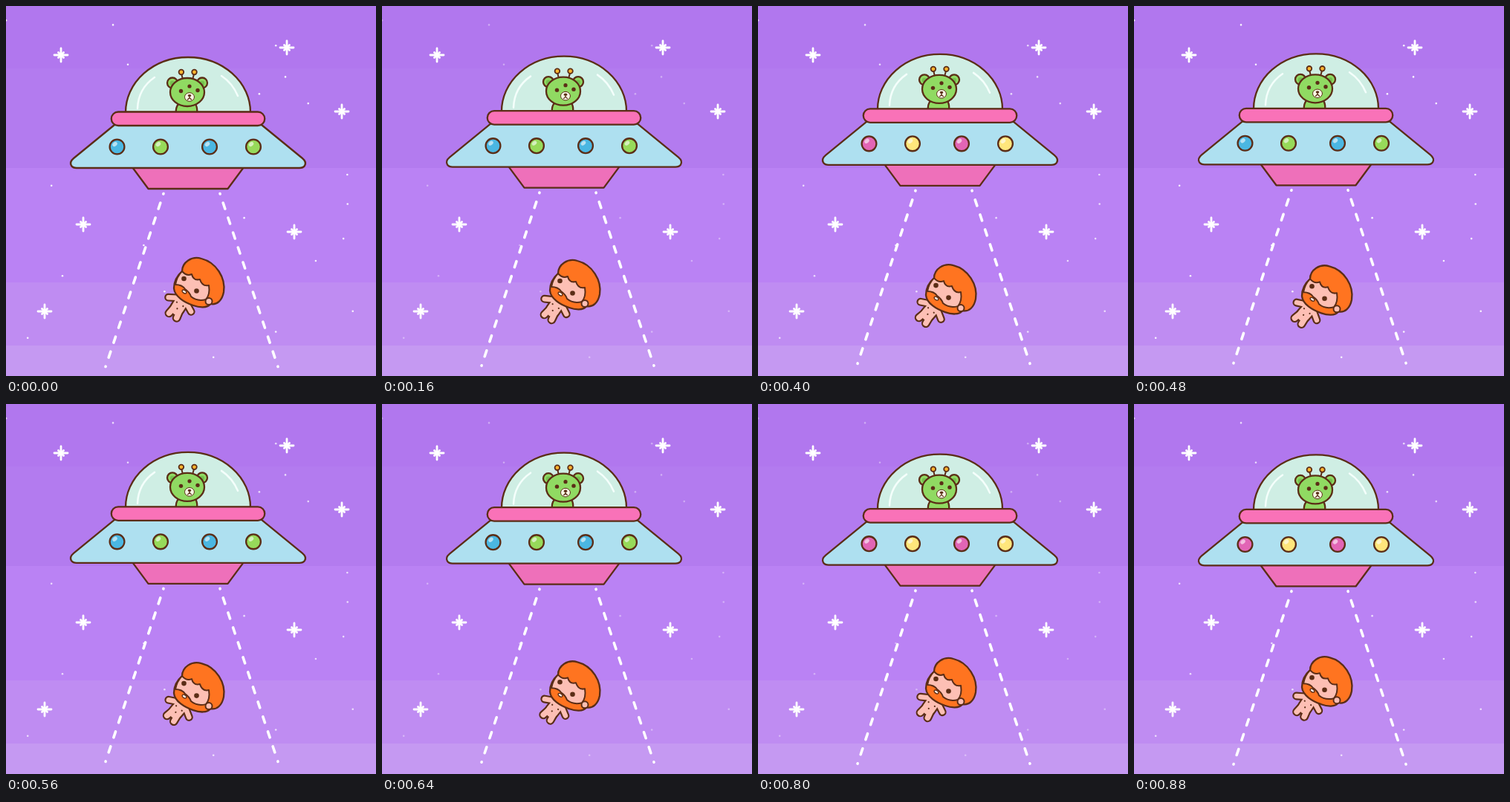
An HTML page with a canvas for the animation above (0.96 s loop, 498x498 px).

```html
<!DOCTYPE html>
<html lang="en">
<head>
<meta charset="utf-8">
<title>Abduction</title>
<style>
html, body { margin: 0; width: 100%; height: 100%; overflow: hidden; background: #b982f4; }
canvas { display: block; }
</style>
</head>
<body>
<canvas id="stage" width="498" height="498"></canvas>
<script>
const ctx = document.getElementById('stage').getContext('2d');
const STEP = 80, STEPS = 12;
const INK = '#5b2d16', SKIN = '#fdbfb4', HAIR = '#ff7420', GREEN = '#90da62';

const bands = [[0, '#b177ee'], [84, '#b37bef'], [218, '#ba82f4'], [372, '#bf8cf2'], [457, '#c599f2']];
const bigStars = [[74, 66], [378, 56], [452, 142], [104, 294], [388, 304], [52, 411]];

function shape(path, fill, width = 2.3, stroke = INK) {
  const p = typeof path === 'string' ? new Path2D(path) : path;
  if (fill) { ctx.fillStyle = fill; ctx.fill(p); }
  if (width) { ctx.lineWidth = width; ctx.strokeStyle = stroke; ctx.stroke(p); }
}

function oval(x, y, rx, ry, fill, width = 0, turn = 0) {
  const p = new Path2D();
  p.ellipse(x, y, rx, ry, turn, 0, Math.PI * 2);
  shape(p, fill, width);
}

function line(x1, y1, x2, y2, width, color) {
  ctx.beginPath();
  ctx.moveTo(x1, y1);
  ctx.lineTo(x2, y2);
  ctx.lineWidth = width;
  ctx.strokeStyle = color;
  ctx.stroke();
}

function drawSky(step) {
  for (const [y, color] of bands) {
    ctx.fillStyle = color;
    ctx.fillRect(0, y, 498, 498 - y);
  }
  for (const [x, y] of bigStars) {
    for (let i = 0; i < 4; i++) {
      const reach = i % 2 ? 5 : 9, a = i * Math.PI / 4;
      const dx = reach * Math.cos(a), dy = reach * Math.sin(a);
      line(x - dx, y - dy, x + dx, y + dy, 2.8, '#fff');
    }
  }
  // small stars: one jittered row each, twinkling twice per loop
  ctx.globalAlpha = 0.55 + 0.35 * Math.cos(step * Math.PI / 3);
  let seed = 7;
  const random = () => (seed = seed * 16807 % 2147483647) / 2147483647;
  for (let i = 0; i < 23; i++) oval(498 * random(), 21 * (i + random()), 1.3, 1.3, '#fff');
  ctx.globalAlpha = 1;
}

function drawBeam() {
  ctx.setLineDash([8.4, 12.7]);
  ctx.lineDashOffset = 7.9;
  for (const side of [-1, 1]) line(250 + side * 38, 252.5, 250 + side * 116, 485.5, 3.6, '#fff');
  ctx.setLineDash([]);
}

function drawBear() {
  shape('M229 144 Q228 137 232 132 L255 132 Q258 137 257 144', GREEN);
  for (const side of [-1, 1]) {
    line(244.7 + side * 8.8, 90, 244.5 + side * 6.5, 99, 2, INK);
    oval(244.7 + side * 8.8, 89, 3.3, 3.3, '#ffb52e', 1.8);
    oval(244 + side * 20, 103.5, 7, 7, GREEN, 2.3);
    oval(244 + side * 20, 104, 3.2, 3.2, '#75c04e');
  }
  oval(244, 116, 23, 19, GREEN, 2.3);
  oval(247, 108, 2.6, 2.6, INK);
  oval(235.5, 114.5, 2.7, 2.7, INK);
  oval(258, 113.5, 2.7, 2.7, INK);
  oval(247, 122.5, 6.5, 5.8, '#f8f8e4', 1);
  oval(247, 120.5, 2.3, 1.6, INK);
  shape('M247 121 V123.5 L244.5 126 M247 123.5 L249.5 126', null, 1.3);
}

function drawShip(step) {
  shape('M161 143 A84 74 0 0 1 329 143 Z', '#cfeee4');
  shape('M177 138 Q178 111 200 96', null, 2.5, '#f4fffb');
  shape('M290 94 Q305 104 312 121', null, 2.5, '#f4fffb');
  drawBear();
  shape('M170 217 L191.5 246 H298.5 L320 217 Z', '#ee70ba');
  shape('M146 160 L91 205 Q85 210 88 215 Q90 218 95 218 H395 Q400 218 402 215 Q405 210 399 205 L344 160 Z', '#aee0f0');
  shape('M151 142.5 H339 A9.2 9.2 0 0 1 339 161 H151 A9.2 9.2 0 0 1 151 142.5 Z', '#f972b8');
  const colors = Math.floor(step / 3) % 2 ? ['#e265b5', '#ffe67c'] : ['#4bb7e2', '#97da5a'];
  [149.5, 208, 274, 333].forEach((x, i) => {
    oval(x, 189.5, 9.9, 9.9, colors[i % 2], 2.3);
    oval(x - 3, 186, 3.6, 2.6, 'rgba(255,255,255,.6)', 0, -0.7);
  });
}

// Body hangs from the neck; arms and legs mirror each other
function drawBody(swing) {
  ctx.save();
  ctx.translate(240, 392);
  ctx.rotate(0.56 + swing);
  for (const [grow, color] of [[4.4, INK], [0, SKIN]]) {
    line(0, 4, 0, 18, 17 + grow, color);
    for (const side of [-1, 1]) {
      line(side * 8, 6, side * 18, 11.5, 6.5 + grow, color);
      line(side * 4.5, 20, side * 6, 29, 7.5 + grow, color);
    }
  }
  for (const side of [-1, 1]) oval(side * 5, 11, 1.1, 1.1, INK);
  oval(0, 18, 1.1, 1.1, INK);
  ctx.restore();
}

function drawHead() {
  shape('M237 357 C237 345 250 336 263 340 C283 345 296 366 293 385 C291 396 284 403 275 401 ' +
    'C271 407 260 406 252 403 C240 399 227 391 226 380 C226 370 230 363 237 357 Z', HAIR);
  shape('M237 357 Q243 364 250 361 Q252 370 261 368 Q264 378 273 376 Q275 388 269 395 ' +
    'Q257 398 249 391 Q247 385 241 381 Q237 375 228 375 Q230 364 237 357 Z', SKIN, 2);
  oval(273, 397.5, 4.5, 4.5, SKIN, 2);
  oval(239.5, 367, 3.3, 3.3, INK);
  oval(256.5, 383.5, 3.3, 3.3, INK);
  oval(240, 384.5, 3.2, 2, '#fff0e8', 1.4, 0.6);
}

function frame(now) {
  const step = Math.floor(now / STEP) % STEPS;
  const pose = Math.min(step, STEPS - step) / 6;
  // halfway between linear and cosine easing
  const lift = (pose + (1 - Math.cos(pose * Math.PI)) / 2) / 2;

  drawSky(step);
  ctx.save();
  ctx.translate(0, -4.7 * lift);
  drawBeam();
  drawShip(step);
  ctx.restore();

  ctx.save();
  ctx.translate(0, 10.3 * lift);
  drawBody(0.16 * lift);
  drawHead();
  ctx.restore();
  requestAnimationFrame(frame);
}

ctx.lineCap = ctx.lineJoin = 'round';
frame(0);
</script>
</body>
</html>
```
